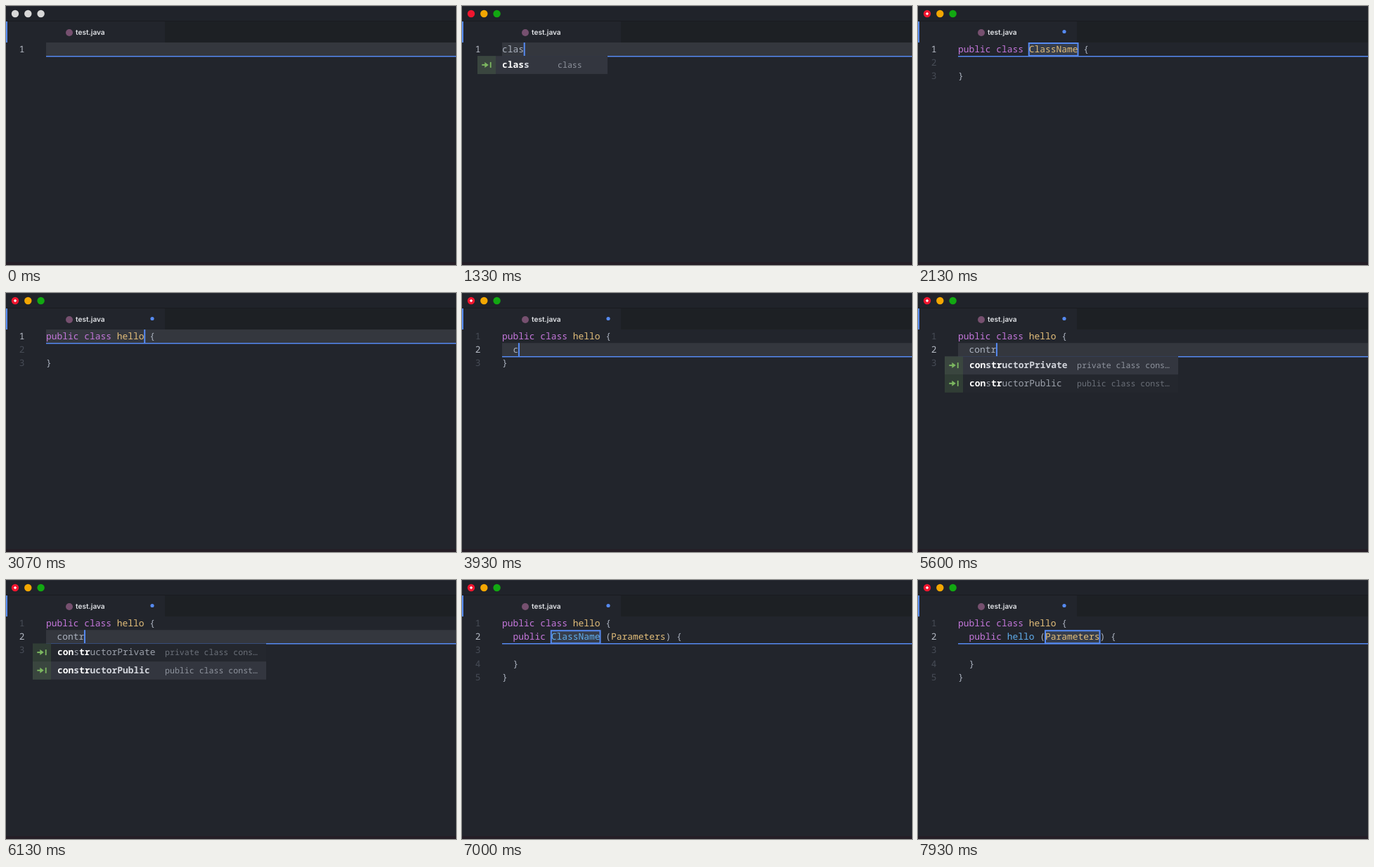
Animation, 640 px wide and 369 px high, one loop 8000 ms. Source, as an HTML page with a canvas:

```html
<!DOCTYPE html>
<html lang="en">
<head>
<meta charset="utf-8">
<title>Editor snippets</title>
<style>
  html, body { margin: 0; width: 100%; height: 100%; overflow: hidden; background: #22252c; }
  canvas { display: block; width: 100vw; height: 100vh; }
</style>
</head>
<body>
<canvas id="stage" width="640" height="369"></canvas>
<script>
const ctx = document.getElementById('stage').getContext('2d');
const LOOP = 8000;
const LEFT = 57, TOP = 52, LINE = 19.2, CHAR = 7.75, ROW = 25.7;
const MONO = '"Noto Sans Mono", monospace';
const color = {
  bg: '#22252c', bar: '#1d2024', active: '#34373e', accent: '#568af2',
  text: '#abb2bf', keyword: '#c678dd', type: '#e5c07b', call: '#61afef',
  gutter: '#474c56', bright: '#b5bac4'
};

// Completion popups: each item is [label, matched letter indexes, description, has snippet icon]
const constructors = [
  ['constructorPrivate', 'private class cons…'],
  ['constructorPublic', 'public class const…']
];
const ctorItems = matched => constructors.map(([label, note]) => [label, matched, note, true]);
const classPopup = typed => ({
  x: 22, right: 207, noteX: 136,
  items: [['class', [0, 1, 2, 3, 4].slice(0, typed), 'class', true]]
});
const filePopup = {
  x: 38, right: 626, noteX: 485,
  items: [
    ...ctorItems([0, 1, 2]),
    ['commentMethod', [0, 1, 5], 'method comment', true],
    ['Give Any Page Room with Columns! by Martin Oldwick…', [], 'File'],
    ['Screen Shot 2017-01-21 at 8.06.17 AM.png', [], 'File'],
    ['Screen Shot 2017-01-22 at 9.22.00 AM.png', [], 'File']
  ]
};
const ctorPopup = (matched, extra = []) => ({
  x: 38, right: 370, noteX: 226, items: [...ctorItems(matched), ...extra]
});
const contPopup = ctorPopup([0, 1, 2, 4], [['commentMethod', [0, 1, 5, 6], 'method comment', true]]);
const contrPopup = ctorPopup([0, 1, 2, 4, 5]);

// Timeline: every step holds until the next one
const steps = [];
const step = (at, lines, row, state) => steps.push({ at, lines, row, ...state });
const typing = (times, word, draw) =>
  times.forEach((at, i) => draw(at, word.slice(0, i + 1), i + 1));

const classHead = name => `public class ${name} {`;
const withBody = body => [classHead('hello'), body, '}'];
const withCtor = name => [classHead('hello'), `  public ${name} (Parameters) {`, '', '  }', '}'];

step(0, [''], 0, { unfocused: true });
step(600, [''], 0, { caret: 0 });
typing([870, 1000, 1130, 1270, 1400], 'class', (at, word, n) =>
  step(at, [word], 0, { caret: n, popup: n > 2 && classPopup(n) }));
step(1730, [classHead('ClassName'), '', '}'], 0, { selected: 'ClassName', dirty: true });
typing([2200, 2330, 2470, 2600, 2730], 'hello', (at, word, n) =>
  step(at, [classHead(word), '', '}'], 0, { caret: 13 + n, dirty: true }));
step(3470, withBody('  '), 1, { caret: 2, dirty: true });
typing([3930, 4070, 4270, 4870, 5070], 'contr', (at, word, n) =>
  step(at, withBody('  ' + word), 1, {
    caret: 2 + n, dirty: true, popup: [, , , filePopup, contPopup, contrPopup][n]
  }));
step(5870, withBody('  contr'), 1, { caret: 7, dirty: true, popup: contrPopup, choice: 1 });
step(6270, withCtor('ClassName'), 1, { selected: 'ClassName', dirty: true });
typing([7200, 7300, 7400, 7500, 7600], 'hello', (at, word, n) =>
  step(at, withCtor(word), 1, { caret: 9 + n, dirty: true }));
step(7730, withCtor('hello'), 1, { selected: 'Parameters', dirty: true });

function rect(x, y, w, h, fill) {
  ctx.fillStyle = fill;
  ctx.fillRect(x, y, w, h);
}

function disc(x, y, r, fill) {
  ctx.fillStyle = fill;
  ctx.beginPath();
  ctx.arc(x, y, r, 0, 2 * Math.PI);
  ctx.fill();
}

function text(str, x, y, fill, font, align = 'left') {
  ctx.font = font;
  ctx.textAlign = align;
  ctx.fillStyle = fill;
  ctx.fillText(str, x, y);
}

const codeFont = (weight = 400) => `${weight} 12.92px ${MONO}`;

function drawWindow({ unfocused, dirty }) {
  rect(0, 0, 640, 369, color.bg);
  rect(0, 0, 640, 22, '#20232a');
  rect(0, 0, 640, 1, '#292c34');
  rect(0, 21, 640, 1, '#191b20');
  rect(226, 22, 414, 30, color.bar);
  rect(0, 22, 2, 30, color.accent);
  rect(0, 365, 640, 4, '#251e26');
  ['#f0162f', '#f3a702', '#12a812'].forEach((fill, i) =>
    disc(13 + 18.3 * i, 11, 5.2, unfocused ? '#d8d8d8' : fill));
  if (dirty) {
    rect(11, 10.3, 4, 1.4, '#fff');
    rect(12.3, 9, 1.4, 4, '#fff');
    disc(208, 36.5, 2.6, color.accent);
  }
  disc(90, 38, 5, '#76506f');
  text('test.java', 99, 41, '#e2e4e8', '600 10.1px Inter, sans-serif');
}

function tokenColor(line, word, start) {
  const before = line.slice(0, start), after = line.slice(start + word.length);
  if (/^(public|class)$/.test(word)) return color.keyword;
  if (/class $|\($/.test(before)) return color.type;
  return /^ \(/.test(after) && word.trim() ? color.call : color.text;
}

function drawCode({ lines, row, caret, selected }) {
  const top = TOP + LINE * row;
  if (!selected) rect(LEFT, top, 640 - LEFT, LINE, color.active);
  rect(LEFT, Math.round(top + LINE - 0.5), 640 - LEFT, 1.5, color.accent);

  if (selected) {
    const x = LEFT + CHAR * lines[row].indexOf(selected);
    rect(x, top + 1, CHAR * selected.length, 18, '#363d4b');
    ctx.strokeStyle = color.accent;
    ctx.lineWidth = 2;
    ctx.strokeRect(x, top + 1, CHAR * selected.length, 18);
  }
  lines.forEach((line, i) => {
    const y = 66 + LINE * i;
    text(i + 1, 26.5, y, i === row ? color.bright : color.gutter, codeFont(), 'right');
    for (const { 0: word, index } of line.matchAll(/\w+|[^\w\s]+/g))
      text(word, LEFT + CHAR * index, y, tokenColor(line, word, index), codeFont());
  });
  if (caret !== undefined) rect(LEFT + CHAR * caret - 0.3, top, 2, LINE, color.accent);
}

function drawArrow(x, y) {
  const green = '#7cb760';
  rect(x + 6, y - 1, 6, 2, green);
  rect(x + 17.5, y - 4, 1.8, 8, green);
  ctx.beginPath();
  ctx.moveTo(x + 10, y - 4);
  ctx.lineTo(x + 15.5, y);
  ctx.lineTo(x + 10, y + 4);
  ctx.fill();
}

function drawPopup({ popup, row, choice = 0 }) {
  const { x, right, noteX, items } = popup;
  const top = TOP + LINE * (row + 1);
  rect(x, top, right - x, ROW * items.length, '#24272e');
  items.forEach(([label, matched, note, snippet], i) => {
    const y = top + ROW * i, chosen = i === choice;
    if (chosen) rect(x, y, right - x, ROW, '#33363f');
    if (snippet) {
      rect(x, y, 26, ROW, chosen ? '#3a463f' : '#303d35');
      drawArrow(x + 0.3, y + 12.7);
    }
    [...label].forEach((letter, n) => {
      const hit = matched.includes(n);
      text(letter, x + 35 + CHAR * n, y + 16.6,
        hit ? '#fff' : chosen ? '#d2d5dc' : '#9da2ac',
        codeFont(hit ? 800 : chosen ? 600 : 400));
    });
    text(note, noteX, y + 16.6, chosen ? '#8f949e' : '#6b7079', `400 11.58px ${MONO}`);
  });
}

function render(now) {
  const time = now % LOOP;
  const state = steps.findLast(s => s.at <= time);
  ctx.textRendering = 'geometricPrecision';
  drawWindow(state);
  drawCode(state);
  if (state.popup) drawPopup(state);
  requestAnimationFrame(() => render(performance.now()));
}
render(0);
</script>
</body>
</html>
```
